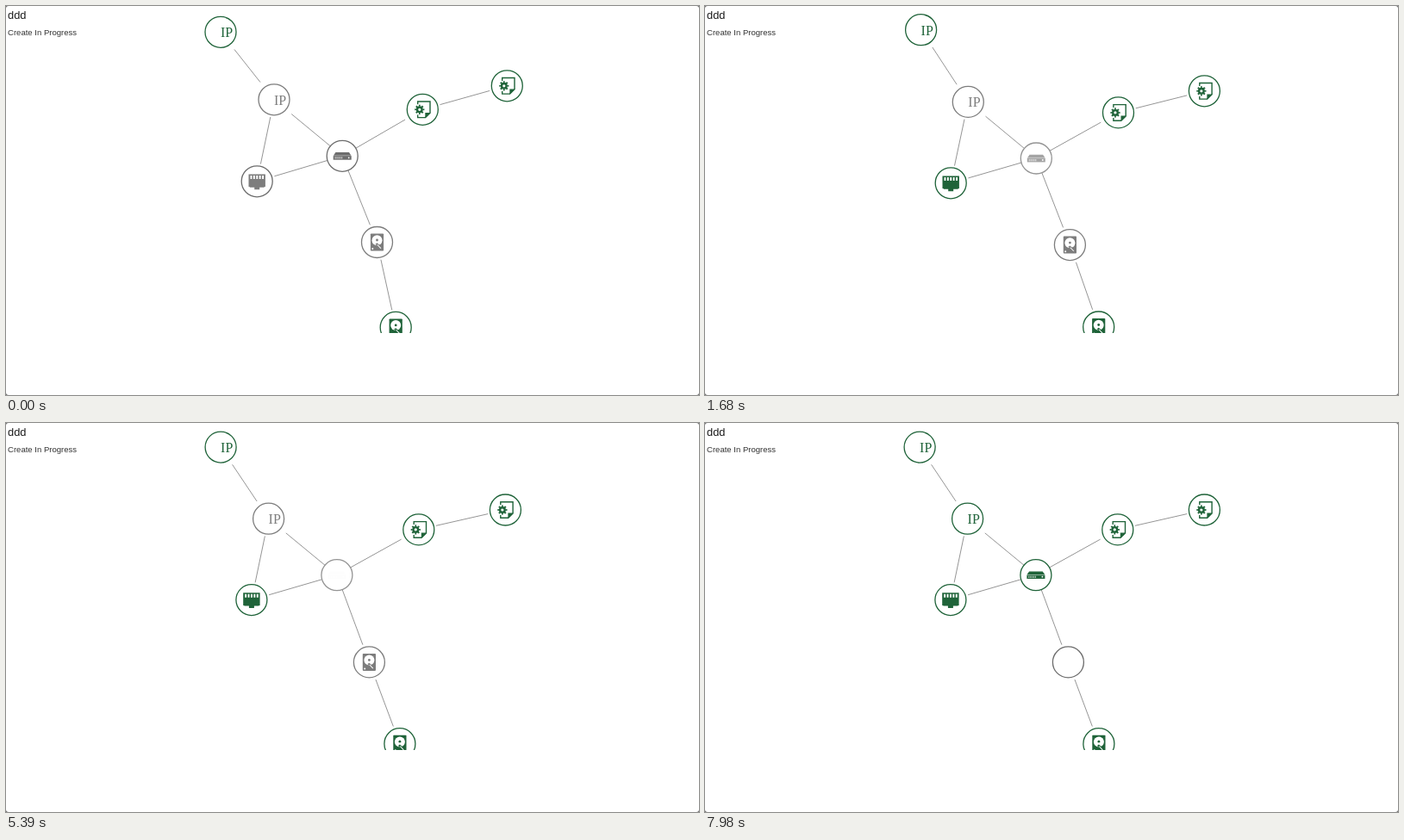
Recreate the animation shown at these times as an HTML page. Size 804 px wide and 452 px high, loop 8000 ms.

```html
<!DOCTYPE html>
<html lang="en">
<head>
<meta charset="utf-8">
<title>Network graph</title>
<style>
  html, body { margin: 0; width: 100%; height: 100%; overflow: hidden; background: #666; }
  #stage { position: relative; width: 804px; height: 452px; background: #fff; border-radius: 3px; overflow: hidden; }
  p { position: absolute; left: 2px; margin: 0; white-space: nowrap; font-family: "Liberation Sans", Arial, sans-serif; }
  .title { top: 3px; font-size: 12.9px; line-height: 15px; color: #1c1c1c; }
  .status { top: 25px; font-size: 9.55px; line-height: 12px; color: #333; }
  svg { position: absolute; left: 0; top: 0; }
  line { stroke: #959595; stroke-width: 1; }
  .ring { fill: #fff; stroke: currentColor; stroke-width: 1.3; }
  .icon { fill: currentColor; }
  .icon text { font: 800 16px Inter, "Liberation Sans", sans-serif; text-anchor: middle; }
  .w { fill: #fff; }
  .o { fill: none; stroke: currentColor; }
</style>
</head>
<body>
<div id="stage">
  <svg width="804" height="379.5" viewBox="0 0 804 379.5">
    <defs>
      <g id="ip"><text y="5.8">IP</text></g>
      <g id="port">
        <path d="M-9.7-8.3H9.7V6.3H8.5V7H3V9.5H-3V7H-8.5V6.3H-9.7Z"/>
        <path class="w" d="M-7.7-6.8h1.9v4h-1.9zM-4.3-6.8h1.9v4h-1.9zM-.9-6.8h1.9v4h-1.9zM2.5-6.8h1.9v4h-1.9zM5.9-6.8h1.9v4h-1.9z"/>
      </g>
      <g id="server">
        <path d="M-7.8-4.2H7.8L10.3-.6H-10.3Z"/>
        <path d="M-10.5-.2H10.5V4.4H-10.5Z"/>
        <path class="w" opacity=".75" d="M-8.6 1h1v2.3h-1zM-6.7 1h1v2.3h-1zM-4.8 1h1v2.3h-1zM-2.9 1h1v2.3h-1zM-1 1h1v2.3h-1z"/>
        <circle class="w" cx="7.5" cy="2" r=".9"/>
      </g>
      <g id="disk">
        <rect x="-7.6" y="-10" width="15.2" height="20" rx=".8"/>
        <circle class="w" cx="0" cy="-2.3" r="6"/>
        <circle cx="0" cy="-2.5" r="1.4"/>
        <path d="M-2 2.2L0 .8L5.5 5.5L4 7.5Z"/>
        <path class="w" d="M.6 2.6L4.8 6.8L4 7.5L.1 3.3Z"/>
        <circle class="w" cx="-5.2" cy="7.6" r="1"/>
      </g>
      <g id="config">
        <path class="o" stroke-width="1.4" d="M-5.6-5.8V-9.3H8.7V4L3.3 9.3H-5.6V6"/>
        <path d="M9.3 3.6H3V9.9Z"/>
        <circle class="w" cx="-3.5" r="6.3"/>
        <circle class="o" cx="-3.5" r="2.8" stroke-width="2.4"/>
        <circle class="o" cx="-3.5" r="4.6" stroke-width="2" pathLength="16" stroke-dasharray="1 1" stroke-dashoffset=".5"/>
      </g>
    </defs>
    <g id="links"></g>
    <g id="nodes"></g>
  </svg>
  <p class="title">ddd</p>
  <p class="status">Create In Progress</p>
</div>
<script>
const LOOP = 8000, STEP = 70;
const GREEN = '#1f6339', GRAY = '#7d7d7d', DARK = '#6c6c6c', PALE = '#949494';
const PORT_DONE = 1330, SERVER_DONE = 7770, FADE_LOW = 5430, FADE_SPAN = 5400;
const SHAKE_START = 7212, SHAKE_SPAN = 700;
const SHAKE = [0, -1, 2, -4, 4, -4, 4, -4, 2, -1, 0];

// Settling path of every node at these times
const TIMES = [0, 980, 1680, 2450, 3080];
const nodes = {
  ipA:     { icon: 'ip',     x: [249, 253, 250.6, 249.6, 249.1],       y: [30.3, 26.8, 27.7, 28, 28.1] },
  ipB:     { icon: 'ip',     x: [311, 307.2, 305.3, 304.8, 304.6],     y: [108.8, 110.9, 111.4, 111.3, 111.2], shaky: true },
  port:    { icon: 'port',   x: [291.2, 287.1, 285.2, 285, 284.9],     y: [203.8, 205.3, 205.8, 205.8, 205.6] },
  server:  { icon: 'server', x: [390.2, 386.3, 384.3, 384.1, 383.9],   y: [174.3, 176.5, 177, 176.9, 176.7], shaky: true },
  configA: { icon: 'config', x: [483.3, 480.4, 479.5, 479, 478.8],     y: [120.3, 122.6, 123.9, 124, 123.9] },
  configB: { icon: 'config', x: [581.3, 579.2, 579.4, 579.4, 579.4],   y: [92.8, 95.6, 98.8, 100.4, 101] },
  diskA:   { icon: 'disk',   x: [430.5, 425.6, 423.4, 422, 421.4],     y: [274.5, 277, 277.6, 277.8, 277.9], shaky: true },
  diskB:   { icon: 'disk',   x: [452.2, 456, 456.7, 456.8, 456.9],     y: [373.4, 373.2, 373, 372.8, 372.7] }
};
const links = [
  ['ipA', 'ipB'], ['ipB', 'port'], ['ipB', 'server'], ['port', 'server'],
  ['server', 'configA'], ['configA', 'configB'], ['server', 'diskA'], ['diskA', 'diskB']
];

function add(parent, tag, attrs) {
  const el = document.createElementNS('http://www.w3.org/2000/svg', tag);
  for (const k in attrs) el.setAttribute(k, attrs[k]);
  return parent.appendChild(el);
}

const lines = links.map(() => add(document.getElementById('links'), 'line', {}));
for (const name in nodes) {
  const n = nodes[name];
  n.el = add(document.getElementById('nodes'), 'g', {});
  if (name !== 'server') add(n.el, 'rect', { class: 'w', x: -20.2, y: -20.2, width: 40.4, height: 40.4 });
  n.ring = add(n.el, 'circle', { class: 'ring', r: 18 });
  n.glyph = add(n.el, 'g', { class: 'icon' });
  add(n.glyph, 'use', { href: '#' + n.icon });
}

function slope(v, i) {
  const last = TIMES.length - 1;
  if (i === last) return 0;
  const a = Math.max(i - 1, 0), b = i + 1;
  return (v[b] - v[a]) / (TIMES[b] - TIMES[a]);
}

// Cubic Hermite curve through the settling points
function along(v, t) {
  const last = TIMES.length - 1;
  if (t >= TIMES[last]) return v[last];
  let i = 0;
  while (t >= TIMES[i + 1]) i++;
  const h = TIMES[i + 1] - TIMES[i], u = (t - TIMES[i]) / h, w = 1 - u;
  return v[i] * (1 + 2 * u) * w * w + v[i + 1] * u * u * (3 - 2 * u)
    + h * u * w * (slope(v, i) * w - slope(v, i + 1) * u);
}

function shake(t) {
  const p = (t - SHAKE_START) / SHAKE_SPAN * 10;
  if (p <= 0 || p >= 10) return 0;
  const i = Math.floor(p), u = p - i;
  return SHAKE[i] + (SHAKE[i + 1] - SHAKE[i]) * u * u * (3 - 2 * u);
}

function paint(name, color, ring = color, opacity = 1) {
  const n = nodes[name];
  n.glyph.style.color = color;
  n.ring.style.color = ring;
  n.glyph.style.opacity = opacity;
}

function draw(t) {
  const done = t >= SERVER_DONE, started = t >= PORT_DONE;
  for (const name in nodes) {
    const n = nodes[name];
    n.px = along(n.x, t);
    n.py = along(n.y, t);
    n.el.setAttribute('transform', `translate(${n.px + (n.shaky ? shake(t) : 0)} ${n.py})`);
    paint(name, GREEN);
  }
  if (!started) paint('port', GRAY, DARK);
  if (!done) {
    paint('ipB', GRAY);
    if (started) paint('server', GRAY, PALE, Math.min(1, Math.abs(t - FADE_LOW) / FADE_SPAN));
    else paint('server', DARK);
  }
  paint('diskA', GRAY, done ? DARK : GRAY, done ? 0 : 1);
  links.forEach(([a, b], i) => {
    const p = nodes[a], q = nodes[b], set = (k, v) => lines[i].setAttribute(k, v);
    set('x1', p.px); set('y1', p.py); set('x2', q.px); set('y2', q.py);
  });
}

const start = performance.now();
function tick() {
  const t = (performance.now() - start) % LOOP;
  draw(Math.floor(t / STEP) * STEP);
  requestAnimationFrame(tick);
}
tick();
</script>
</body>
</html>
```
